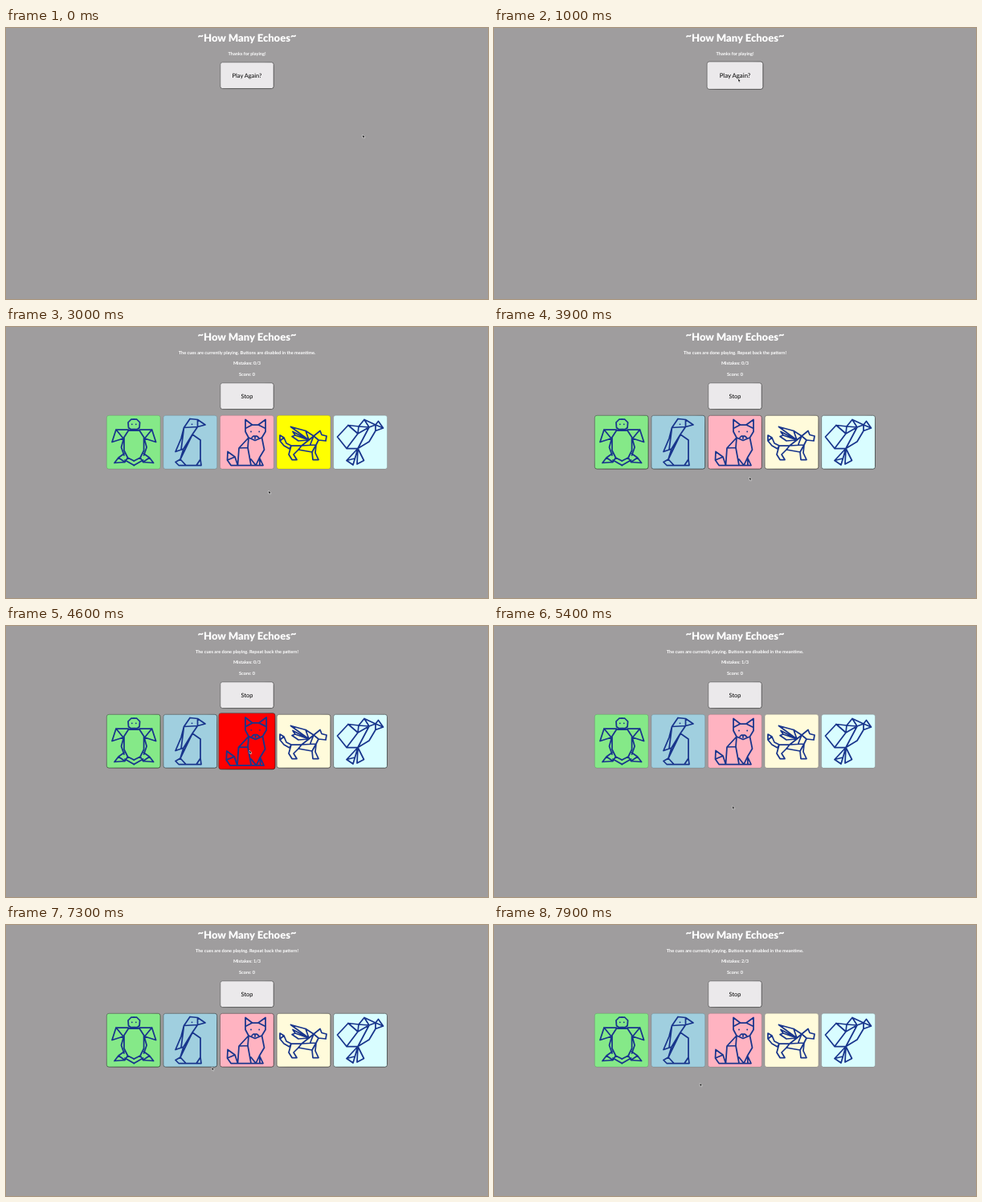
Recreate the animation shown at these times as an HTML page. Size 600x338 px, loop 8000 ms.

```html
<!DOCTYPE html>
<html lang="en">
<head>
<meta charset="utf-8">
<title>Memory game</title>
<style>
html, body { margin: 0; width: 100%; height: 100%; overflow: hidden; background: #9f9d9e; }
svg { display: block; width: 600px; height: 338px; }
text { font-family: Lato, "Open Sans", sans-serif; text-anchor: middle; text-rendering: geometricPrecision; }
.title { font-size: 13px; font-weight: 900; fill: #fff; }
.note { font-size: 5.6px; font-weight: 700; fill: #fff; }
.label { font-size: 7.4px; font-weight: 500; fill: #111; }
.ink { fill: none; stroke: #18358c; stroke-width: 1.75; stroke-linejoin: round; stroke-linecap: round; }
.eye { fill: #18358c; }
</style>
</head>
<body>
<svg id="stage" viewBox="0 0 600 338">
  <linearGradient id="edge" x2="1" y2="1">
    <stop offset=".4" stop-color="#4c4c4c"/>
    <stop offset=".6" stop-color="#111"/>
  </linearGradient>
  <rect width="600" height="338" fill="#9f9d9e"/>
</svg>
<script>
const LOOP = 8000, STEP = 100;
const GAME_START = 1500;
const CARD = { y: 110.3, size: 66.8, first: 125.3, pitch: 70.6 };
const EDGE = 'url(#edge)', FAINT_EDGE = 'rgba(16,16,16,.25)';

// Line art uses stage coordinates.
const animals = [
  { fill: '#85e988', lit: '#008000', eyes: [[156.8, 121.3], [161.8, 121.3]],
    half: 'M159.3 115H156L152 119L152.5 125.5L155 127.5H159.3' +
          'M159.3 129H152.5L147 137.5V154L151.5 163L159.3 167' +
          'M152.5 128H137L132 143.5L146 139L137 128M147 137.5L143.5 150L147 160' +
          'M147 158L140 163L135 169.5L148 168.5L151.5 163M140 163L148 168.5M148 166L159.3 172.5' },
  { fill: '#a0cfdf', lit: '#0000ff', eyes: [[231.5, 121.3]],
    path: 'M221.5 125.5L229 114.5L238.5 115.5L248 122L238.5 124.5L221.5 125.5M238.5 115.5V124.5' +
          'M221.5 125.5L218 139L211 155.5L221 152L232 134L238.5 124.5M221.5 125.5L218 153' +
          'M232 134L242 141V165L237 172.5M221 152L217 165L232 134' +
          'M217 165L211 168.5L215 172.5H243L242 165L237 172.5M217 165L224 172.5' },
  { fill: '#ffb3c1', lit: '#ff0000', eyes: [[305, 130.5], [315.2, 130.5]],
    path: 'M298 115.5L306.5 122H314L323 115.5V130.5L318.5 138L310 141.5L302 138L298 130.5V115.5' +
          'M298 126.5L306.5 122M323 126.5L314 122M306 138L308 136H312L314.5 138M310 136V139' +
          'M302 138L290 151L288.5 172.5M290 151L301 150.5L302 138M301 150.5L305 172.5' +
          'M318.5 138L321.5 153L315.5 163L316 172.5M305 165L311 172.5L315.5 163L320 172.5' +
          'M276 155.5L275.5 166L280 172.5H320M276 155.5L285 162L288.5 172.5M275.5 166L285 162' },
  { fill: '#fffbdb', lit: '#ffff00', eyes: [],
    path: 'M341 135L346 138L349 145L355 148L353 152L346 148L341 142ZM341 142L346 138' +
          'M355 148H368L386 147L389 141L398 142L399 136L393 134.5L391 129.5L383 136L379 146' +
          'M383 136L389 141M354.5 124.5L373 129.5L383 136L377 141L354.5 124.5' +
          'M373 129.5L377 141L357 130.5L360 135L377 141M360 135L356 136.5L364 142L377 141L368 148' +
          'M355 148L352 159L356 165.5H362L358 159L364 153L368 148M364 153L381 156' +
          'M386 147L385 157L389 165.5H382L381 156L386 147' },
  { fill: '#d9fdff', lit: '#00ffff', eyes: [],
    path: 'M412.5 137L426 122.5L438 133L424 151.5ZM426 122.5L439 124L446 115.5L460 122L463.5 117.5' +
          'L469.5 126L460 129.5L452 143L438 151.5L424 151.5M439 124L452 125L446 115.5M439 124L438 133' +
          'M452 125L438 133M452 125L438 151.5M460 122L452 125M460 122L469.5 126M460 122V129.5' +
          'M438 151.5L424 166.5L432 172L438 151.5L437 171L445.5 166.5ZM424 166.5L434 164' }
];

const messages = {
  play: 'The cues are currently playing. Buttons are disabled in the meantime.',
  done: 'The cues are done playing. Repeat back the pattern!'
};

// Each phase holds from its time until the next one.
const phases = [
  { at: 0, msg: 'play', mistakes: 0 },
  { at: 3700, msg: 'done', mistakes: 0 },
  { at: 4900, msg: 'play', mistakes: 1 },
  { at: 7000, msg: 'done', mistakes: 1 },
  { at: 7600, msg: 'play', mistakes: 2 }
];

// Card index, start, end.
const flashes = [[3, 2600, 3600], [2, 4500, 4900], [3, 5900, 6900], [1, 7500, 7600]];

// Time, x, y of the pointer tip.
const trail = [
  [0, 444, 133], [300, 425, 152], [700, 340, 85], [1000, 304, 63], [1500, 303, 64],
  [1800, 302.5, 94], [2100, 309, 140], [2500, 321, 224], [3000, 327, 204], [3700, 326, 203],
  [4200, 303, 158], [4600, 303, 155], [4900, 303, 157], [5300, 297, 225], [6100, 292.8, 209],
  [6600, 285, 200], [7300, 256.3, 177.2], [7500, 250, 168], [7600, 253, 174],
  [7700, 257, 205], [7900, 256.3, 197]
];

const stage = document.getElementById('stage');

function add(parent, tag, attrs, content) {
  const node = document.createElementNS(stage.namespaceURI, tag);
  for (const key in attrs) node.setAttribute(key, attrs[key]);
  if (content) node.textContent = content;
  return parent.appendChild(node);
}

const note = (parent, y, content) => add(parent, 'text', { class: 'note', x: 300, y }, content);
const show = (node, on) => node.setAttribute('visibility', on ? 'visible' : 'hidden');

function makeBox(parent, x, y, w, h, fill) {
  const group = add(parent, 'g', {});
  const rect = add(group, 'rect', {
    x, y, width: w, height: h, rx: 2.8, fill, stroke: EDGE, 'stroke-width': 0.6
  });
  return { group, rect, x, y, w, h };
}

function makeButton(parent, y, label) {
  const box = makeBox(parent, 266.8, y, 66.4, 32.8, '#ebe9eb');
  add(box.group, 'text', { class: 'label', x: 300, y: y + 19 }, label);
  return box;
}

function makeCard(animal, i) {
  const box = makeBox(game, CARD.first + i * CARD.pitch, CARD.y, CARD.size, CARD.size, animal.fill);
  if (animal.half) {
    add(box.group, 'path', { class: 'ink', d: animal.half });
    add(box.group, 'path', { class: 'ink', d: animal.half, transform: 'translate(318.6 0) scale(-1 1)' });
  } else {
    add(box.group, 'path', { class: 'ink', d: animal.path });
  }
  for (const [cx, cy] of animal.eyes) add(box.group, 'circle', { class: 'eye', cx, cy, r: 0.9 });
  return box;
}

const title = add(stage, 'text', { class: 'title', x: 300, y: 17 });
add(title, 'tspan', { dy: -3.5 }, '~');
add(title, 'tspan', { dy: 3.5 }, 'How Many Echoes');
add(title, 'tspan', { dy: -3.5 }, '~');

const ending = add(stage, 'g', {});
note(ending, 34, 'Thanks for playing!');
const again = makeButton(ending, 42.8, 'Play Again?');

const game = add(stage, 'g', {});
const message = note(game, 34);
const mistakes = note(game, 47.4);
note(game, 61, 'Score: 0');
const stop = makeButton(game, 69.8, 'Stop');
const cards = animals.map(makeCard);

const pointer = add(stage, 'path', {
  d: 'M0 0V4.2L1 3.4L1.7 4.9L2.4 4.6L1.7 3.1H3Z',
  fill: '#000', stroke: '#fff', 'stroke-width': 0.5
});

function pointerAt(t) {
  const i = trail.findIndex(p => p[0] > t);
  if (i < 0) return trail[trail.length - 1].slice(1);
  const [t0, x0, y0] = trail[i - 1], [t1, x1, y1] = trail[i];
  const k = (t - t0) / (t1 - t0), e = k * k * (3 - 2 * k);
  return [x0 + (x1 - x0) * e, y0 + (y1 - y0) * e];
}

function setHover(box, [px, py], enabled) {
  const { x, y, w, h } = box;
  const over = enabled && px >= x && px <= x + w && py >= y && py <= y + h;
  const cx = x + w / 2, cy = y + h / 2;
  box.group.setAttribute('transform',
    over ? `translate(${cx} ${cy}) scale(1.05) translate(${-cx} ${-cy})` : '');
}

function render(t) {
  const playing = t >= GAME_START;
  const phase = phases.filter(p => p.at <= t).pop();
  const enabled = phase.msg === 'done';
  const lit = flashes.find(([, from, to]) => t >= from && t < to);
  const tip = pointerAt(t);

  show(ending, !playing);
  show(game, playing);
  message.textContent = messages[phase.msg];
  mistakes.textContent = `Mistakes: ${phase.mistakes}/3`;
  setHover(again, tip, !playing);
  setHover(stop, tip, playing);
  cards.forEach((card, i) => {
    card.rect.setAttribute('fill', lit && lit[0] === i ? animals[i].lit : animals[i].fill);
    card.rect.setAttribute('stroke', enabled ? EDGE : FAINT_EDGE);
    setHover(card, tip, enabled);
  });
  pointer.setAttribute('transform', `translate(${tip[0]} ${tip[1]})`);
}

const start = performance.now();
function tick() {
  const t = (performance.now() - start) % LOOP;
  render(Math.floor(t / STEP) * STEP);
  requestAnimationFrame(tick);
}
tick();
</script>
</body>
</html>
```
